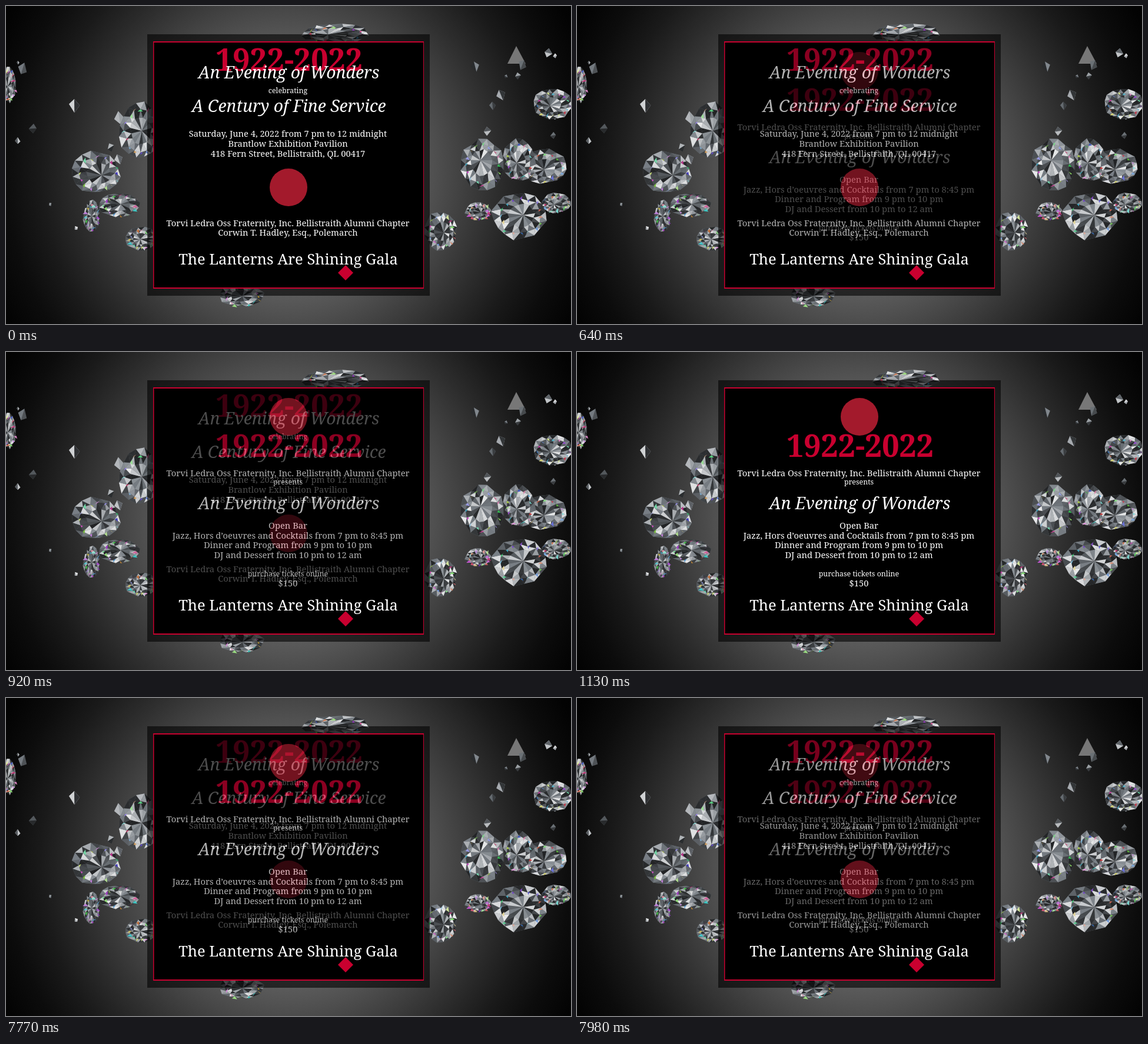
An HTML page with a canvas for the animation above (8 s loop, 960x540 px).

```html
<!DOCTYPE html>
<html lang="en">
<head>
<meta charset="utf-8">
<title>Gala invitation</title>
<style>
  html, body { margin: 0; width: 100%; height: 100%; overflow: hidden; background: #000; }
  canvas, svg { position: absolute; left: 0; top: 0; }
  text { font: 14.7px "Noto Serif", serif; fill: #fff; text-anchor: middle; }
  .years { font-size: 52.3px; font-weight: 700; fill: #c8002f; }
  .script { font-size: 28.4px; font-style: italic; }
  .small { font-size: 12.4px; }
  .title { font-size: 25.5px; }
  .scene { mix-blend-mode: plus-lighter; }
  .crest { fill: #a31a2c; }
</style>
</head>
<body>
<canvas id="backdrop" width="960" height="540"></canvas>
<svg width="960" height="540" viewBox="0 0 960 540">
  <rect x="240" y="48" width="480" height="444" opacity=".6"/>
  <rect x="250" y="60" width="460" height="420" fill="#c8002f"/>
  <rect x="251.5" y="62" width="457.5" height="416"/>

  <g class="scene" id="invite">
    <text class="years" x="481" y="109.5">1922-2022</text>
    <text class="script" x="480.5" y="123">An Evening of Wonders</text>
    <text class="small" x="479" y="148">celebrating</text>
    <text class="script" x="480.5" y="180">A Century of Fine Service</text>
    <text x="479" y="222">Saturday, June 4, 2022 from 7 pm to 12 midnight</text>
    <text x="479" y="239">Brantlow Exhibition Pavilion</text>
    <text x="479" y="256">418 Fern Street, Bellistraith, QL 00417</text>
    <circle class="crest" cx="480" cy="308" r="32"/>
    <text x="479" y="374">Torvi Ledra Oss Fraternity, Inc. Bellistraith Alumni Chapter</text>
    <text x="479" y="390">Corwin T. Hadley, Esq., Polemarch</text>
  </g>

  <g class="scene" id="program">
    <text class="years" x="481" y="177.5">1922-2022</text>
    <circle class="crest" cx="480" cy="110" r="32"/>
    <text x="479" y="211">Torvi Ledra Oss Fraternity, Inc. Bellistraith Alumni Chapter</text>
    <text class="small" x="479" y="225">presents</text>
    <text class="script" x="480.5" y="267">An Evening of Wonders</text>
    <text x="479" y="300">Open Bar</text>
    <text x="479" y="317">Jazz, Hors d’oeuvres and Cocktails from 7 pm to 8:45 pm</text>
    <text x="479" y="333">Dinner and Program from 9 pm to 10 pm</text>
    <text x="479" y="350">DJ and Dessert from 10 pm to 12 am</text>
    <text class="small" x="479" y="381">purchase tickets online</text>
    <text x="479" y="398">$150</text>
  </g>

  <text class="title" x="479.5" y="439">The Lanterns Are Shining Gala</text>
  <path d="M577 440l13 13-13 13-13-13z" fill="#c8002f"/>
</svg>

<script>
const ctx = document.getElementById('backdrop').getContext('2d');

let seed = 11;
const rand = (min = 0, max = 1) =>
  min + (max - min) * (seed = seed * 16807 % 2147483647) / 2147483647;

function polygon(points, fill) {
  ctx.beginPath();
  points.forEach(p => ctx.lineTo(...p));
  ctx.closePath();
  ctx.fillStyle = fill;
  ctx.fill();
}

const gray = () => `hsl(210 5% ${14 + 78 * rand() ** 1.4}%)`;
const sparkle = () => `hsl(${rand(0, 360)} 55% ${rand(45, 75)}%)`;

// Rings of triangles around an off-centre apex, with small sparkles on top
function drawGem(x, y, rx, ry) {
  const sides = 16;
  const apexX = rand(-.25, .25), apexY = rand(-.25, .25);
  const rings = [0, .5, .78, 1].map((r, k) => Array.from({ length: sides }, (_, i) => {
    const a = (i + k / 2) / sides * 2 * Math.PI;
    const d = r * rand(.9, 1.06);
    return [
      x + rx * (apexX * (1 - r) + d * Math.cos(a)),
      y + ry * (apexY * (1 - r) + d * Math.sin(a))
    ];
  }));
  polygon(rings[3], '#66696c');
  for (let k = 0; k < 3; k++) {
    const inner = rings[k], outer = rings[k + 1];
    for (let i = 0; i < sides; i++) {
      const j = (i + 1) % sides;
      polygon([inner[i], inner[j], outer[i]], gray());
      polygon([inner[j], outer[i], outer[j]], gray());
    }
  }
  for (let i = 0; i < sides; i++) {
    const [px, py] = rings[2][i];
    polygon([[px, py], [px + rand(-6, 6), py + 4], [px + 4, py + rand(-6, 6)]], sparkle());
  }
}

function drawShard(x, y, size) {
  const turn = rand(0, 6);
  const corners = [0, 1.3, 2.8, 4.4].map(a =>
    [x + size * .8 * Math.cos(a + turn), y + size * Math.sin(a + turn)]);
  polygon(corners, gray());
  polygon(corners.slice(1), gray());
}

// Cosine falloff from the middle to the corners
const glow = ctx.createRadialGradient(480, 280, 0, 480, 280, 600);
for (let r = 0; r <= 1; r += .1) {
  const v = 63 * (1 + Math.cos(Math.PI * r));
  glow.addColorStop(r, `rgb(${v} ${v} ${v})`);
}
ctx.fillStyle = glow;
ctx.fillRect(0, 0, 960, 540);

polygon([[867, 68], [883, 98], [852, 98]], '#777');
for (let i = 0; i < 11; i++) {
  drawShard(rand(20, 200), rand(90, 400), rand(3, 12));
  drawShard(rand(795, 940), rand(30, 220), rand(3, 10));
}

// The large stones: centre and radii
[
  [228, 212, 36, 48], [153, 283, 42, 36], [145, 357, 14, 27], [193, 338, 35, 21],
  [230, 395, 28, 20], [560, 47, 58, 17], [400, 491, 38, 20], [738, 382, 28, 33],
  [915, 272, 40, 30], [872, 262, 28, 36], [810, 270, 38, 45], [930, 166, 34, 26],
  [935, 335, 25, 17], [872, 357, 47, 40], [802, 349, 22, 15], [4, 133, 13, 31]
].forEach(stone => drawGem(...stone));

// Ten equal steps of 70 ms
const fade = (t, start) => Math.max(0, Math.min(10, Math.floor((t - start) / 70) + 1)) / 10;

const invite = document.getElementById('invite');
const program = document.getElementById('program');

function tick() {
  const t = performance.now() % 8000;
  const mix = fade(t, 500) - fade(t, 7630);
  invite.style.opacity = 1 - mix;
  program.style.opacity = mix;
  requestAnimationFrame(tick);
}
tick();
</script>
</body>
</html>
```
